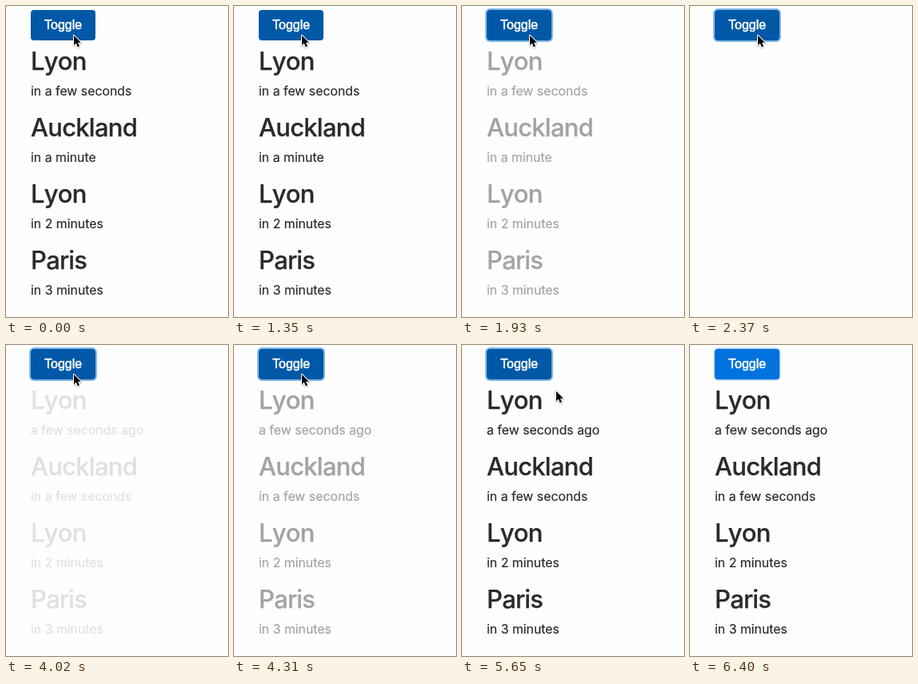
Write an HTML page with a canvas that moves like this. It is 278 by 389 pixels and loops after 6500 ms.

```html
<!DOCTYPE html>
<html lang="en">
<head>
<meta charset="utf-8">
<title>Toggle fade</title>
<style>
  html, body { margin: 0; width: 100%; height: 100%; overflow: hidden; background: #fefefe; }
  canvas { display: block; width: 278px; height: 389px; }
</style>
</head>
<body>
<canvas id="stage"></canvas>
<script>
const W = 278, H = 389, LOOP = 6500;
const TICK = 146;            // time between visible steps
const FADE_STEPS = 7;
const FADE_OUT = 1490, FADE_IN = 4014, POINTER_LEAVES = 5645;

const canvas = document.getElementById('stage');
const ctx = canvas.getContext('2d');
const dpr = window.devicePixelRatio || 1;
canvas.width = W * dpr;
canvas.height = H * dpr;

const cities = ['Lyon', 'Auckland', 'Lyon', 'Paris'];
const before = ['in a few seconds', 'in a minute', 'in 2 minutes', 'in 3 minutes'];
const after = ['a few seconds ago', 'in a few seconds', 'in 2 minutes', 'in 3 minutes'];
const pointerPath = [[84, 35], [117, 56], [267, 306], [262, 378]];

// Whole steps taken since a moment; the first one counts at once.
const steps = (t, from) => Math.max(0, 1 + Math.floor((t - from) / TICK));
const fade = (t, from) => Math.min(1, steps(t, from) / FADE_STEPS);

function focus(t) {
  if (t < 1350) return 0;
  if (t < 1490) return 0.2;
  return t < 6400 ? 1 : 0.7;
}

// The stroke gives the type its slightly heavier rendering.
function label(text, x, y, font, color, weight, spacing = 0) {
  ctx.font = font;
  ctx.letterSpacing = spacing + 'px';
  ctx.fillStyle = ctx.strokeStyle = color;
  ctx.lineWidth = weight;
  ctx.fillText(text, x, y);
  ctx.strokeText(text, x, y);
}

function drawButton(t) {
  const strength = focus(t);
  if (strength) {
    const spread = 2 * strength, half = spread / 2;
    ctx.beginPath();
    ctx.roundRect(31 - half, 5 - half, 81 + spread, 38 + spread, 4 + half);
    ctx.lineWidth = spread;
    ctx.strokeStyle = `rgba(2, 117, 216, ${strength / 2})`;
    ctx.stroke();
  }
  ctx.beginPath();
  ctx.roundRect(31, 5, 81, 38, 4);
  ctx.fillStyle = t < 5800 ? '#0058a7' : '#0072dd';
  ctx.fill();
  ctx.fontKerning = 'normal';
  label('Toggle', 48, 29, '16px "Liberation Sans", Arial, sans-serif', '#fff', 0.5);
}

function drawList(t) {
  const returning = t >= FADE_IN;
  const alpha = returning ? fade(t, FADE_IN) : 1 - fade(t, FADE_OUT);
  if (!alpha) return;
  const shade = Math.round(254 - 212 * alpha);
  const color = `rgb(${shade}, ${shade}, ${shade})`;
  const notes = returning ? after : before;
  cities.forEach((city, i) => {
    const y = 83 * i;
    ctx.fontKerning = 'none';
    label(city, 31, 80 + y, '500 31px Inter, sans-serif', color, 0.25, -0.75);
    ctx.fontKerning = 'normal';
    label(notes[i], 31, 112 + y, '15.85px Inter, sans-serif', color, 0.2);
  });
}

function drawPointer(t) {
  const stop = pointerPath[steps(t, POINTER_LEAVES)];
  if (!stop) return;
  ctx.save();
  ctx.translate(stop[0] + 1, stop[1] + 1.8);
  const arrow = new Path2D('M0 0V12.5L2.8 9.8L4.8 14.4L7 13.5L5 9H8.8Z');
  ctx.lineJoin = 'round';
  ctx.lineWidth = 2;
  ctx.strokeStyle = '#fff';
  ctx.shadowColor = 'rgba(0, 0, 0, 0.4)';
  ctx.shadowBlur = 1.5 * dpr;
  ctx.shadowOffsetY = 0.6 * dpr;
  ctx.stroke(arrow);
  ctx.shadowColor = 'transparent';
  ctx.fillStyle = '#000';
  ctx.fill(arrow);
  ctx.restore();
}

const start = performance.now();

function draw() {
  const t = (performance.now() - start) % LOOP;
  ctx.setTransform(dpr, 0, 0, dpr, 0, 0);
  ctx.fillStyle = '#fefefe';
  ctx.fillRect(0, 0, W, H);
  drawButton(t);
  drawList(t);
  drawPointer(t);
  requestAnimationFrame(draw);
}
draw();
</script>
</body>
</html>
```
